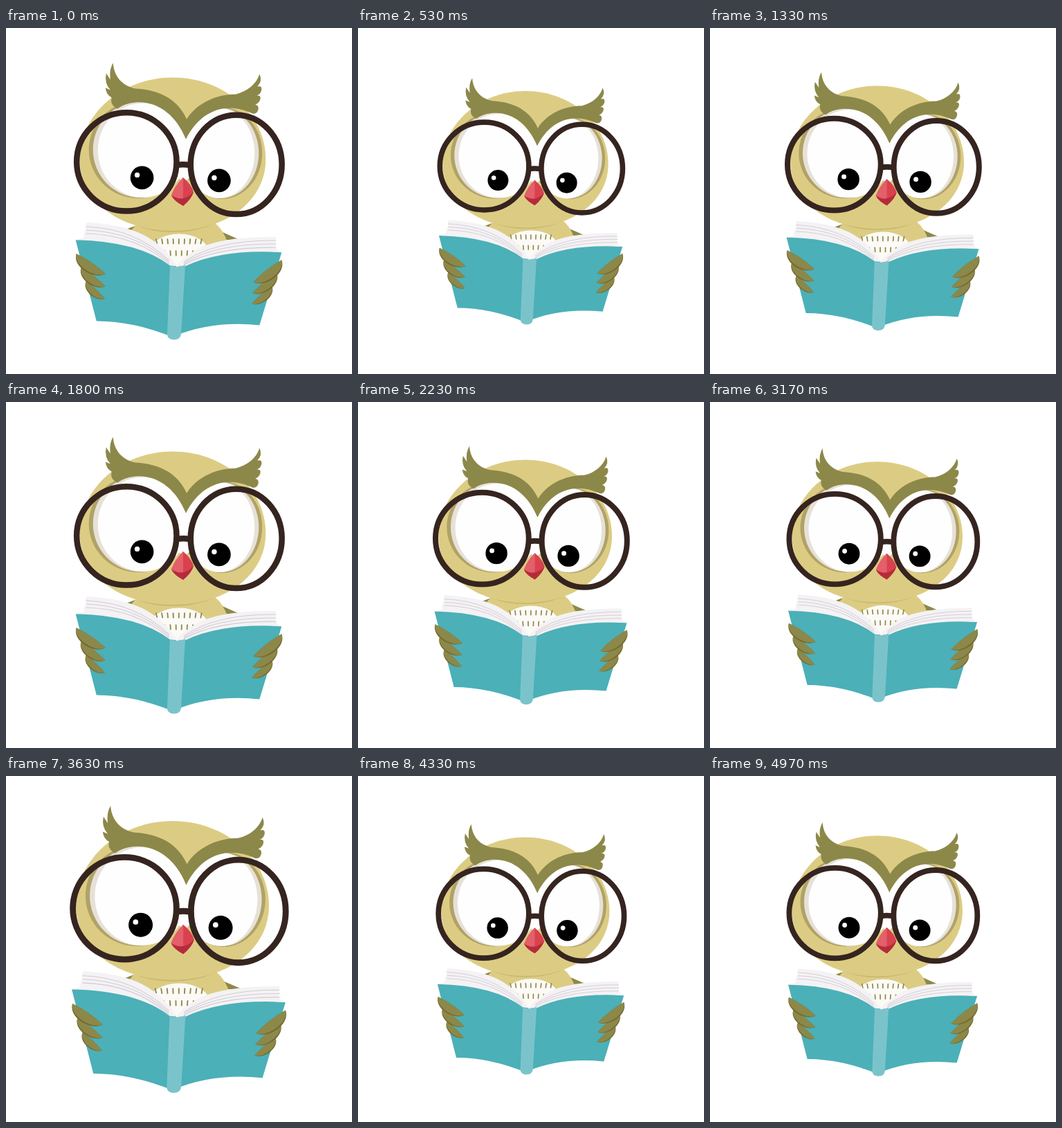
An HTML page that plays this animation: 500 px wide and 500 px high, repeating every 5.01 s.

```html
<!DOCTYPE html>
<html lang="en">
<head>
<meta charset="utf-8">
<title>Reading owl</title>
<style>
html, body { margin: 0; width: 100%; height: 100%; overflow: hidden; background: #fff; }
svg { display: block; width: 100vw; height: 100vh; }
.tan { fill: #dccc83; }
.olive { fill: #8c8849; }
.shade { fill: #b0a267; }
.grey { fill: #e6e1d8; }
.white { fill: #fefefe; }
.teal { fill: #4bb0b8; }
.page { fill: #f4f2f4; }
.lens { fill: none; stroke: #35241f; stroke-width: 8.5; }
.lines { fill: none; stroke: #d2cbd3; }
</style>
</head>
<body>
<svg viewBox="0 0 500 500">
<g id="owl">
  <!-- body -->
  <path class="olive" d="M168 293L192 284V302ZM308 293L338 306H310Z"/>
  <path class="tan" d="M177 298Q183 290 190 282H302Q314 292 320 310L300 350H220Z"/>
  <ellipse cx="250" cy="326" rx="44" ry="28.5" fill="#fcfaf6"/>
  <path id="ticks" fill="none" stroke="#8c8849" stroke-width="1.8" stroke-linecap="round"/>

  <!-- head -->
  <path fill="#c9b86e" d="M150 255Q180 295 241 295T340 255Z"/>
  <path class="tan" d="M107 190C107 125 167 72 241 72S375 125 375 190C375 250 318 293 241 293S107 250 107 190Z"/>
  <ellipse class="shade" cx="191" cy="176" rx="71" ry="70"/>
  <ellipse class="shade" cx="312" cy="181" rx="58" ry="66"/>
  <ellipse class="grey" cx="194" cy="176" rx="68" ry="69"/>
  <ellipse class="grey" cx="310" cy="181" rx="55" ry="65"/>
  <ellipse class="white" cx="198" cy="177" rx="65" ry="68"/>
  <ellipse class="white" cx="308" cy="181" rx="51" ry="65"/>
  <path class="white" d="M236 125L261 155L285 125L276 205L257 224L241 208Z"/>
  <path class="olive" d="M155 51C156 70 168 84 187 88C222 90 248 103 261 132C277 107 306 96 332 96C349 92 362 81 366 67Q371 77 363 85Q370 83 369 90Q368 96 362 98Q369 97 367 104Q365 109 360 111Q366 112 364 119Q362 125 356 124C318 106 281 119 260 161C246 126 218 104 185 108Q172 109 161 117Q150 111 153 101Q145 97 144 87L151 90Q142 80 145 66L151 75Q149 60 155 51Z"/>

  <g id="pupils"></g>
  <path fill="#d9414e" d="M256 216Q268 226 271 237Q268 247 256 257Q243 250 239 242Q244 228 256 216Z"/>
  <path fill="#e35f69" d="M256 216Q244 228 239 242L256 249Z"/>
  <path fill="#b52b3c" d="M239 242Q256 253 271 237Q268 247 256 257Q243 250 239 242Z"/>
  <ellipse class="lens" cx="174.5" cy="193.5" rx="72" ry="71"/>
  <ellipse class="lens" cx="332.5" cy="197.5" rx="65.8" ry="71.5"/>
  <path class="lens" d="M248 198Q257 196.5 266 198.5"/>

  <!-- book -->
  <path class="teal" d="M101 306Q190 302 246 343L243 447Q185 423 131 423Z"/>
  <path class="teal" d="M398 324Q310 317 250 343L243 445Q298 422 366 429Z"/>
  <path class="page" d="M117 281Q170 284 199 299Q228 314 247 344L237 343Q192 308 101 306L113 303Q112 296 116 291Q114 286 117 281Z"/>
  <path class="page" d="M391 302Q328 301 291 313Q265 322 246 344L259 344Q312 319 398 324L392 321Q388 315 390 311Q387 307 391 302Z"/>
  <path id="lines" class="lines"/>
  <path d="M237 343Q248 347 259 342L253 442Q252 450 242 450Q233 449 233 442Z" fill="#7bc3ca"/>

  <g id="hands"></g>
</g>
</svg>
<script>
const $ = id => document.getElementById(id);

// belly marks and page edges
let ticks = '', lines = '';
for (let row = 0; row < 2; row++) {
  for (let i = 0; i < 9 - row; i++) {
    const x = 217 + row * 4 + i * 8.2;
    ticks += `M${x} ${305 + row * 17}l${(250 - x) / 25} 6.5`;
  }
}
for (let i = 0; i < 3; i++) {
  lines += `M116 ${287 + i * 5}Q188 ${290 + i * 4.5} 236 ${336 + i * 2.5}`;
  lines += `M390 ${307 + i * 5}Q303 ${306 + i * 5} 257 ${338 + i * 2}`;
}
$('ticks').setAttribute('d', ticks);
$('lines').setAttribute('d', lines);

const pupil = (x, y) => `<circle cx="${x}" cy="${y}" r="16.8"/>
  <circle cx="${x - 7}" cy="${y - 4}" r="3.7" fill="#fff"/>`;
$('pupils').innerHTML = pupil(196.7, 216.5) + pupil(307.8, 220.5);

// a leaf from base to tip, full on its lower side
function finger(x, y, tipX, tipY) {
  const dx = tipX - x, dy = tipY - y, size = Math.hypot(dx, dy);
  const turn = Math.atan2(dy, dx) * 180 / Math.PI;
  const leaf = bulge => `M0 0Q.5 -.08 1 0C.85 ${bulge} .12 ${bulge * 1.2} 0 0Z`;
  return `<g transform="translate(${x} ${y}) rotate(${turn}) scale(${size} ${Math.sign(dx) * size})">
    <path d="${leaf(.32)}" fill="#756a30"/><path class="olive" d="${leaf(.27)}"/></g>`;
}
let hands = '';
for (let i = 2; i >= 0; i--) {
  hands += finger(102 + i * 7, 326 + i * 20, 144 - i / 2, 355 + i * 18);
  hands += finger(398 - i * 7, 335 + i * 19, 357 - i, 367 + i * 15.5);
}
$('hands').innerHTML = hands;

// sizes at even distances from the peak of a pulse to its low point
const sizes = [1.14, 1.082, .987, .936, .896, .88];
const LOOP = 5010, STEPS = 150, PERIOD = 27, PEAK = 4.9;

function key(i) {
  const last = sizes.length - 1;
  return sizes[last - Math.abs(last - Math.abs(i))];
}

function sizeAt(step) {
  const phase = Math.abs(step % PERIOD - PEAK);
  const pos = Math.min(phase, PERIOD - phase) / (PERIOD / 2) * (sizes.length - 1);
  const i = Math.floor(pos), u = pos - i;
  const [a, b, c, d] = [-1, 0, 1, 2].map(k => key(i + k));
  return b + u / 2 * (c - a + u * (2 * a - 5 * b + 4 * c - d + u * (3 * (b - c) + d - a)));
}

const start = performance.now();

function draw(now) {
  const t = Math.max(0, now - start) % LOOP;
  const step = Math.min(STEPS - 1, Math.floor((t + 9) * 3 / 100));
  $('owl').setAttribute('transform', `translate(250 250) scale(${sizeAt(step)}) translate(-250 -250)`);
  requestAnimationFrame(draw);
}
draw(start);
</script>
</body>
</html>
```
